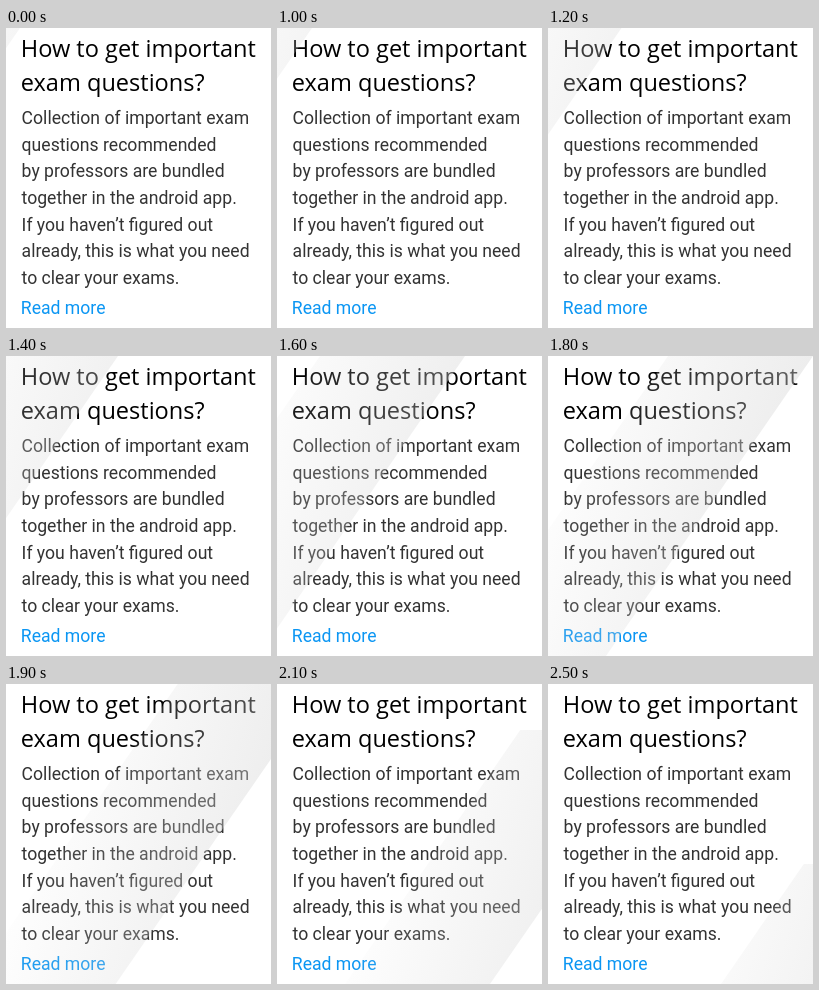
Recreate the animation shown at these times as an HTML page. Size 265 by 300 pixels, loop 2600 ms.

```html
<!DOCTYPE html>
<html lang="en">
<head>
<meta charset="utf-8">
<style>
  html, body { margin: 0; height: 100%; overflow: hidden; background: #fff; }
  svg { display: block; width: 265px; height: 300px; }
  .title { font: 23.55px "Open Sans", sans-serif; fill: #000; }
  .body { font: 17.62px Roboto, sans-serif; fill: #333; }
  .link { fill: #0b96f3; }
</style>
</head>
<body>
<svg viewBox="0 0 265 300">
  <defs>
    <linearGradient id="shade" x1="0" y1="1" x2="1" y2="0">
      <stop offset=".1" stop-color="#d8d8d8" stop-opacity="0"/>
      <stop offset="1" stop-color="#d8d8d8" stop-opacity=".5"/>
    </linearGradient>
  </defs>
  <g id="copy"></g>
  <rect id="shine" width="145" height="400" fill="url(#shade)"/>
</svg>
<script>
const SLANT = 0.69;      // horizontal shift of the band per pixel of height
const WIDTH = 145;
const STEP = 100, HOLD = 1000, LOOP = 2600;
// [step, where the leading edge meets the top of the stage]
const PATH = [[0, 14], [1, 35], [5, 112], [7, 188], [9, 265], [12, 420], [16, 525]];

const copy = document.getElementById('copy');
const shine = document.getElementById('shine');

function addLine(text, className, x, y) {
  const line = document.createElementNS('http://www.w3.org/2000/svg', 'text');
  line.textContent = text;
  line.setAttribute('class', className);
  line.setAttribute('x', x);
  line.setAttribute('y', y);
  copy.append(line);
}

['How to get important', 'exam questions?']
  .forEach((text, i) => addLine(text, 'title', 14.8, 29 + i * 34));
[
  'Collection of important exam',
  'questions recommended',
  'by professors are bundled',
  'together in the android app.',
  'If you haven’t figured out',
  'already, this is what you need',
  'to clear your exams.'
].forEach((text, i) => addLine(text, 'body', 15.6, Math.round(96 + i * 80 / 3)));
addLine('Read more', 'body link', 14.8, 286);

function leadingEdge(step) {
  const i = PATH.findIndex(([s]) => s >= step);
  if (i === 0) return PATH[0][1];
  const [s0, x0] = PATH[i - 1], [s1, x1] = PATH[i];
  return x0 + (x1 - x0) * (step - s0) / (s1 - s0);
}

function draw(now) {
  const t = now % LOOP;
  const step = t < HOLD ? 0 : 1 + Math.floor((t - HOLD) / STEP);
  const top = 46 + 33.5 * (step - 12);
  const left = leadingEdge(step) - WIDTH - SLANT * top;
  shine.setAttribute('transform', `matrix(1 0 ${-SLANT} 1 ${left} ${top})`);
  requestAnimationFrame(draw);
}
requestAnimationFrame(draw);
</script>
</body>
</html>
```
